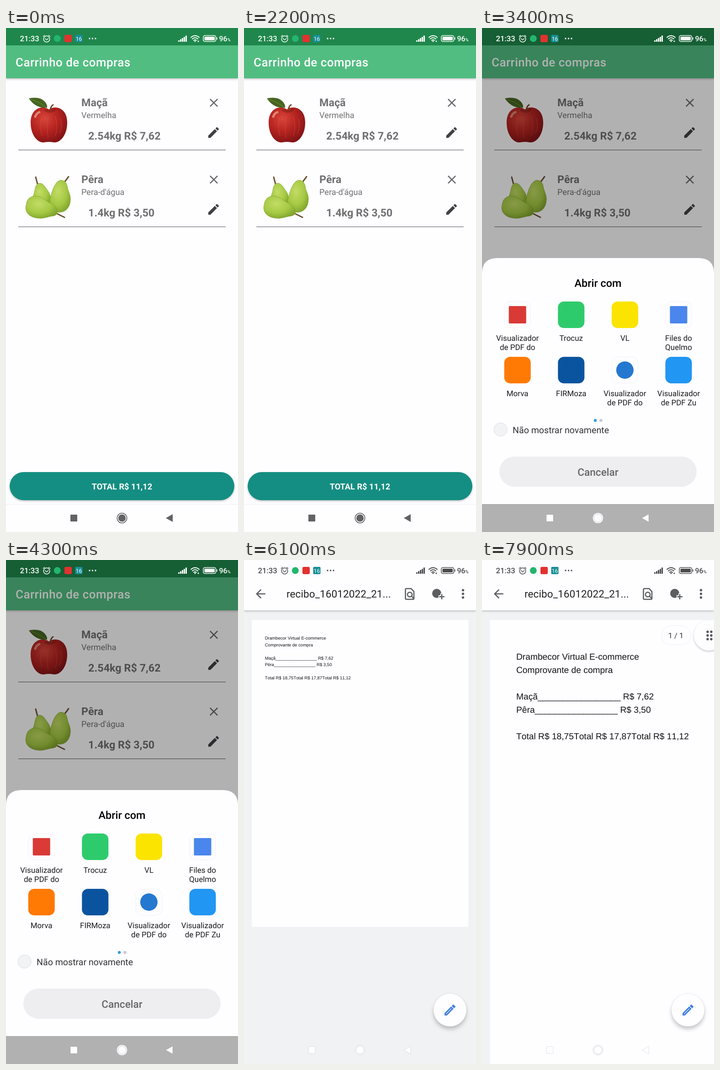
Recreate the animation shown at these times as an HTML page. Size 508x1102 px, loop 8 s.

```html
<!DOCTYPE html>
<html lang="pt-BR">
<head>
<meta charset="utf-8">
<title>Carrinho de compras</title>
<style>
html, body { margin: 0; height: 100%; overflow: hidden; background: #fefdff }
svg { display: block; width: 100vw; height: 100vh }
text { font-family: Roboto, sans-serif; text-rendering: geometricPrecision }
.mid { text-anchor: middle }
.b { font-weight: 700 }
.m { font-weight: 500 }
.lift { filter: drop-shadow(0 2px 2px rgba(0,0,0,.22)) }
.soft { filter: drop-shadow(0 6px 5px rgba(0,0,0,.2)) drop-shadow(0 0 1px rgba(0,0,0,.12)) }
#page text { font: 12px "Liberation Sans", Arial, sans-serif; font-kerning: none; fill: #111 }
#apps text { font-size: 17px; text-anchor: middle; fill: #1c1c1c }
</style>
</head>
<body>
<svg viewBox="0 0 508 1102" preserveAspectRatio="none">
<defs>
  <radialGradient id="red" cx=".38" cy=".32" r=".75">
    <stop offset="0" stop-color="#d9453a"/><stop offset=".5" stop-color="#b52320"/><stop offset="1" stop-color="#7d1214"/>
  </radialGradient>
  <radialGradient id="green" cx=".4" cy=".35" r=".7">
    <stop offset="0" stop-color="#c3dc66"/><stop offset=".6" stop-color="#a5c943"/><stop offset="1" stop-color="#7fa32c"/>
  </radialGradient>
  <g id="tools">
    <path fill="#686868" transform="translate(439.5 148) scale(1.294)" d="M19 6.4 17.6 5 12 10.6 6.4 5 5 6.4 10.6 12 5 17.6 6.4 19 12 13.4 17.6 19 19 17.6 13.4 12z"/>
    <path fill="#414045" transform="translate(439 213) scale(1.294)" d="M3 17.25V21h3.75L17.81 9.94l-3.75-3.75zM20.71 7.04c.39-.39.39-1.02 0-1.41l-2.34-2.34c-.39-.39-1.02-.39-1.41 0l-1.83 1.83 3.75 3.75z"/>
    <path stroke="#727272" stroke-width="1.3" d="M27 266.6H481"/>
  </g>
</defs>

<g id="cart">
  <rect width="508" height="1102" fill="#fefdff"/>
  <rect class="lift" y="38" width="508" height="72" fill="#52bd81"/>
  <rect width="508" height="38" fill="#1f874b"/>
  <text class="m" x="21" y="84" font-size="25.9" letter-spacing=".5" fill="#fff">Carrinho de compras</text>
  <g fill="none" stroke-linecap="round">
    <path fill="url(#red)" d="M94 178C106 169 134 173 134 207 134 235 118 252 104 250Q94 248 84 250C70 252 54 235 54 207 54 173 82 169 94 178Z"/>
    <path stroke="#5b1a10" stroke-width="6" opacity=".35" d="M87 180q9 5 19-1"/>
    <path stroke="#e9a08c" stroke-width="5" opacity=".75" d="M64 194q3-8 9-10"/>
    <path stroke="#d9664a" stroke-width="1.5" opacity=".3" d="M78 196q-6 20 1 40M92 194q-3 24 0 46M108 194q7 22 0 42M119 198q6 18-2 32"/>
    <path stroke="#6a4a25" stroke-width="3" d="M97 179q1-8 6-11"/>
    <path fill="#46651f" d="M50 154q24-5 35 7 6 7 5 13-24 3-40-20Z"/>
    <path stroke="#79934a" d="M54 156q18 5 33 17"/>
  </g>
  <g stroke="#6d5230" stroke-width="3" stroke-linecap="round">
    <path d="M65 326l4 15M137 325l-11 15M110 405l18 9"/>
    <g fill="url(#green)" stroke="#86a836" stroke-width=".8">
      <path d="M70 340c10-4 16 8 21 15 14 18 5 40-14 40s-22-18-16-32c3-9 2-18 9-23Z"/>
      <path d="M113 336c9-8 20 0 21 10 1 9 6 15 7 25 1 18-8 32-24 32-18 0-24-16-20-31 4-16 8-29 16-36Z"/>
      <path d="M51 372c10-8 23-5 33 3 8 7 20 9 26 18 5 8 3 16-6 18-11 1-20 6-32 5-22-1-32-15-28-29 1-6 2-11 7-15Z"/>
    </g>
  </g>
  <g fill="#707070">
    <text class="b" x="165" y="170.5" font-size="23.3">Maçã</text>
    <text x="165" y="197" font-size="18.1">Vermelha</text>
    <text class="b" x="180" y="244" font-size="23.4">2.54kg R$ 7,62</text>
    <text class="b" x="165" y="338.5" font-size="23.3">Pêra</text>
    <text x="165" y="365" font-size="18.1">Pera-d'água</text>
    <text class="b" x="180" y="412" font-size="23.4">1.4kg R$ 3,50</text>
  </g>
  <use href="#tools"/><use href="#tools" y="168"/>
  <rect class="lift" x="8" y="971" width="492" height="61.5" rx="30.75" fill="#148e82"/>
  <text class="b mid" x="254" y="1008.5" font-size="18.2" fill="#fff">TOTAL R$ 11,12</text>
  <path stroke="#eeedef" d="M0 1041.5H508"/>
</g>

<rect id="dim" width="508" height="1102"/>

<g id="sheet">
  <path fill="#fefdff" d="M0 538V34Q0 0 34 0H474Q508 0 508 34V538Z"/>
  <text class="m mid" x="254" y="63" font-size="23.4">Abrir com</text>
  <g id="blanks" fill="#f6f7f9"></g>
  <g id="apps"></g>
  <circle cx="248" cy="355" r="3.2" fill="#2f9fe6"/><circle cx="260.5" cy="355" r="3.2" fill="#c9c9cd"/>
  <circle cx="40.5" cy="375" r="14.5" fill="#f2f3f5" stroke="#dcdde0"/>
  <text x="67" y="382.5" font-size="19.6" fill="#333">Não mostrar novamente</text>
  <rect x="38" y="434" width="432" height="66" rx="33" fill="#eeedf0"/>
  <text class="m mid" x="254" y="475.5" font-size="22.6" fill="#666">Cancelar</text>
</g>

<g id="viewer">
  <rect width="508" height="1102" fill="#f0f2f4"/>
  <g id="page"><rect width="595" height="842" fill="#fefdff"/></g>
  <g id="bar">
    <rect class="lift" y="38" width="508" height="72" fill="#fefdff"/>
    <path fill="#5c5e62" transform="translate(20.8 58.5) scale(1.294)" d="M20 11H7.83l5.59-5.59L12 4l-8 8 8 8 1.41-1.41L7.83 13H20z"/>
    <text x="93" y="82" font-size="22.5" letter-spacing=".1" fill="#222">recibo_16012022_21...</text>
    <g fill="none" stroke="#5c5e62" stroke-width="2.6">
      <path d="M366 62.5H355.5Q353.5 62.5 353.5 65V84Q353.5 86 356 86H370Q372 86 372 84V69ZM367 79l5 6"/>
      <circle cx="363" cy="75.5" r="5"/>
    </g>
    <circle cx="422" cy="73" r="10" fill="#5c5e62"/>
    <path stroke="#fefdff" stroke-width="6" d="M433 73V88M426 80H440"/>
    <path stroke="#5c5e62" stroke-width="2.6" d="M433 74.5V86M427.5 80.2H439"/>
    <g fill="#5c5e62"><circle cx="479.5" cy="66" r="2.7"/><circle cx="479.5" cy="74" r="2.7"/><circle cx="479.5" cy="82" r="2.7"/></g>
  </g>
  <g id="scroller">
    <rect x="393" y="143.5" width="64" height="42" rx="21" fill="#fefdff" stroke="#efeef1"/>
    <text class="mid" x="424.5" y="171" font-size="16.5" fill="#333">1 / 1</text>
    <circle class="lift" cx="497" cy="165" r="33" fill="#fefdff"/>
    <path stroke="#55575a" stroke-width="5.4" stroke-linecap="round" d="M494 157h0M502 157h0M494 165h0M502 165h0M494 173h0M502 173h0"/>
  </g>
  <rect width="508" height="38" fill="#fefdff"/>
  <circle class="soft" cx="451" cy="984" r="36" fill="#fefdff"/>
  <path fill="#3b7ce6" stroke="#3b7ce6" stroke-width=".4" transform="translate(435.5 968.5) scale(1.294)" d="M14.06 9.02l.92.92L5.92 19H5v-.92l9.06-9.06M17.66 3c-.25 0-.51.1-.7.29l-1.83 1.83 3.75 3.75 1.83-1.83c.39-.39.39-1.02 0-1.41l-2.34-2.34c-.2-.2-.45-.29-.71-.29zm-3.6 3.19L3 17.25V21h3.75L17.81 9.94z"/>
</g>

<g id="splash">
  <rect width="508" height="1102" fill="#fefdff"/>
  <circle cx="254" cy="508" r="76" fill="#2fa35f"/>
  <text class="mid" x="254" y="951" font-size="48" fill="#d2d2d4">Quelmo</text>
  <path stroke="#e4e4e6" d="M0 1041.5H508"/>
</g>

<g id="status" fill="currentColor">
  <text class="m" x="30.5" y="29" font-size="16.6">21:33</text>
  <g fill="none" stroke="currentColor" stroke-width="1.5" stroke-linecap="round">
    <circle cx="89" cy="24" r="6.8"/>
    <path d="M85.5 23l3.5 3 3.5-3M81.5 18.5l3-2.5M96.5 18.5l-3-2.5"/>
    <path stroke-width="2" d="M405 20.5q9-7.5 18 0M408 23.8q6-5 12 0M411 27q3-2.5 6 0"/>
    <rect x="432" y="16.5" width="27.5" height="13" rx="3.5"/>
  </g>
  <circle cx="112.3" cy="23" r="7.5" fill="#24b56f"/>
  <rect x="128" y="15" width="16" height="16" rx="3" fill="#e2322f"/>
  <rect x="151.5" y="15" width="16" height="16" rx="2" fill="#178f96"/>
  <text class="mid" x="159.5" y="27.5" font-size="12" fill="#fff">16</text>
  <circle cx="183" cy="23" r="1.7"/><circle cx="189.5" cy="23" r="1.7"/><circle cx="196" cy="23" r="1.7"/>
  <path d="M377 30v-3h3v3zM381 30v-5.5h3v5.5zM385 30v-8h3v8zM389 30v-10.5h3v10.5zM393 30v-13.5h3v13.5z"/>
  <circle cx="414" cy="29" r="1.6"/><circle cx="421" cy="29" r="1.6"/>
  <rect x="434.5" y="19" width="22.5" height="8" rx="1.5"/><path d="M461 20.5h1.5v5H461z"/>
  <text class="m" x="466.5" y="29" font-size="16">96<tspan font-size="9.5">%</tspan></text>
</g>

<g id="nav" fill="currentColor">
  <rect x="141" y="1064" width="15" height="15" rx="1"/>
  <circle cx="254" cy="1071.5" r="11.5"/>
  <circle id="gap" cx="254" cy="1071.5" r="9" fill="none" stroke-width="1.8"/>
  <path d="M350 1071.5L365 1063V1080Z"/>
</g>
</svg>

<script>
const $ = id => document.getElementById(id);
const LOOP = 8000;

// [colour, label lines, shape on a white tile]
const apps = [
  ['#d93a36', ['Visualizador', 'de PDF do'], 'square'],
  ['#2ecb6c', ['Trocuz']],
  ['#fbe400', ['VL']],
  ['#4a86ec', ['Files do', 'Quelmo'], 'square'],
  ['#ff7a05', ['Morva']],
  ['#0a549f', ['FIRMoza']],
  ['#2478cf', ['Visualizador', 'de PDF do'], 'circle'],
  ['#2196f3', ['Visualizador', 'de PDF Zu']],
];
apps.forEach(([color, lines, mark], i) => {
  const x = 77.7 + 117.6 * (i % 4), y = i < 4 ? 124 : 245;
  const box = (size, rx, fill, extra = '') =>
    `<rect x="${x - size / 2}" y="${y - size / 2}" width="${size}" height="${size}" rx="${rx}" fill="${fill}" ${extra}/>`;
  $('blanks').innerHTML += `<circle cx="${x}" cy="${y}" r="31"/>`;
  $('apps').innerHTML +=
    (mark ? box(57, 13, '#fefdff', 'stroke="#f0eff2"') + box(38, mark === 'circle' ? 19 : 2, color) : box(58, 13, color)) +
    lines.map((s, n) => `<text x="${x}" y="${y + 57 + 20 * n}">${s}</text>`).join('');
});

const blank = '_'.repeat(17);
['Drambecor Virtual E-commerce', 'Comprovante de compra', '', `Maçã${blank} R$ 7,62`, `Pêra${blank} R$ 3,50`, '',
 'Total R$ 18,75Total R$ 17,87Total R$ 11,12'].forEach((s, i) => {
  $('page').innerHTML += `<text x="36" y="${54.4 + 18.1 * i}">${s}</text>`;
});

const ramp = (t, a, b) => Math.min(1, Math.max(0, (t - a) / (b - a)));
const smooth = u => u * u * (3 - 2 * u);
const show = (id, on) => $(id).style.display = on ? '' : 'none';
const move = (id, y) => $(id).setAttribute('transform', `translate(0 ${y})`);

// time, scale, left, top of the page
const views = [[6700, .797, 17, 131], [7000, 1.5, -57, 1.4], [7300, 1.5, -57, 1.4], [7800, 1.6, 17.4, 131]];
function pageView(t) {
  let v = views[0].slice(1);
  for (let i = 1; i < views.length; i++) {
    const u = smooth(ramp(t, views[i - 1][0], views[i][0]));
    if (u > 0) v = v.map((_, k) => views[i - 1][k + 1] * (1 - u) + views[i][k + 1] * u);
  }
  return v;
}

function draw(t) {
  const open = ramp(t, 2683, 3083);
  $('dim').style.opacity = .3 * Math.min(1, 1.2 * open);
  show('sheet', open > 0);
  move('sheet', 503 + 599 * (1 - open) ** 2);
  show('blanks', t < 3100);
  show('apps', t >= 3100);

  show('splash', t > 4300 && t < 4900);
  $('splash').style.opacity = ramp(t, 4300, 4600) - ramp(t, 4700, 4900);
  show('viewer', t >= 4600);
  show('bar', t >= 4900);
  show('page', t >= 5300);
  show('scroller', t >= 7500);
  move('bar', -76 * (smooth(ramp(t, 6700, 7000)) - smooth(ramp(t, 7400, 7700))));
  const [s, x, y] = pageView(t);
  $('page').setAttribute('transform', `translate(${x} ${y}) scale(${s})`);

  $('status').style.color = t < 4500 ? '#fff' : t < 4900 ? '#777' : '#4a4a4a';
  const dark = t < 2700 || t >= 4500 && t < 4900;
  $('nav').style.color = dark ? '#626266' : '#fefdff';
  $('nav').setAttribute('stroke', dark ? 'none' : 'rgba(0,0,0,.1)');
  $('gap').setAttribute('stroke', dark ? '#fefdff' : 'rgba(0,0,0,.1)');
}

function tick(now) {
  draw(Math.floor(now % LOOP / 100) * 100);
  requestAnimationFrame(tick);
}
draw(0);
requestAnimationFrame(tick);
</script>
</body>
</html>
```
